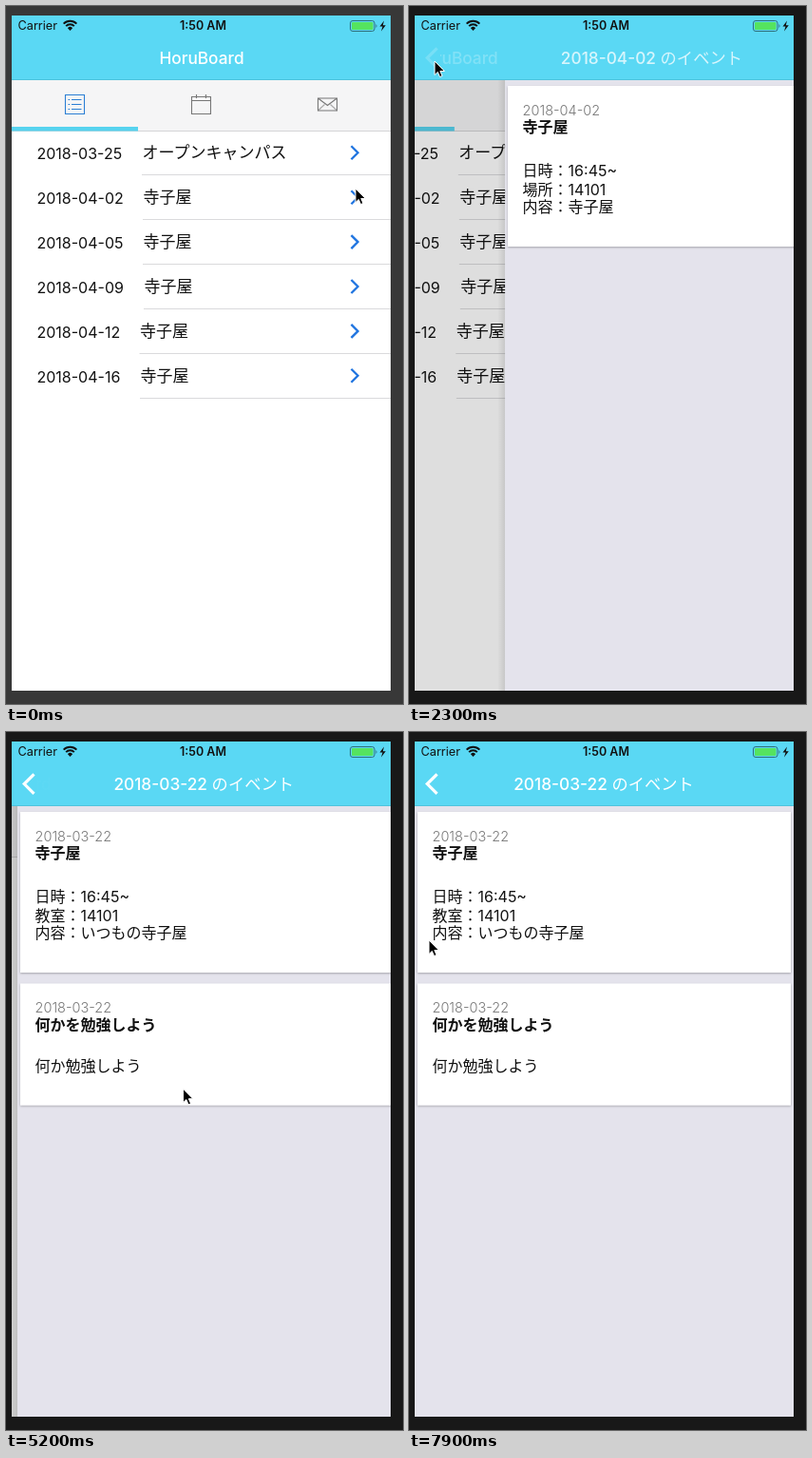
Write an HTML page that moves like this. It is 418 px wide and 734 px high and loops after 8000 ms.

```html
<!DOCTYPE html>
<html lang="ja">
<head>
<meta charset="utf-8">
<title>Event list</title>
<style>
html, body { margin: 0; width: 100%; height: 100%; overflow: hidden; background: #181818; }
svg { display: block; width: 100vw; height: 100vh; }
text { font-family: Inter, "Noto Sans CJK JP", "Noto Sans CJK", sans-serif; font-size: 16px; fill: #111; white-space: pre; }
.mid { text-anchor: middle; }
.nav { font-size: 17.3px; font-weight: 500; fill: #fff; text-anchor: middle; }
.row { font-size: 17px; }
.date { font-size: 14.5px; font-weight: 300; fill: #777; }
.bold { font-weight: 700; }
.week { font-size: 13.3px; fill: #b6b6ba; text-anchor: middle; }
.day { fill: #3a3a3a; text-anchor: middle; }
.icon { fill: none; stroke-width: 1.1; }
</style>
</head>
<body>
<svg id="stage" viewBox="0 0 418 734" preserveAspectRatio="none"></svg>
<script>
const LOOP = 8000, STEP = 100, WIDTH = 399;
const APP = 'HoruBoard';
const BLUE = '#2b7fd4', GRAY = '#777';

const range = n => [...Array(n).keys()];
const rect = (x, y, w, h, fill, more = '') =>
  `<rect x="${x}" y="${y}" width="${w}" height="${h}" fill="${fill}" ${more}/>`;
const path = (d, more = '') => `<path d="${d}" ${more}/>`;
const text = (x, y, cls, s) => `<text x="${x}" y="${y}" class="${cls}">${s}</text>`;
const group = (id, body, more = '') => `<g id="${id}" ${more}>${body}</g>`;

function listPage() {
  const days = ['03-25', '04-02', '04-05', '04-09', '04-12', '04-16'];
  const left = [143.5, 144.5, 144.5, 145.5, 141, 141.5];
  return rect(6, 78, WIDTH, 642, '#fff') + days.map((day, i) => {
    const y = 46.9 * i;
    return text(32.5, 161 + y, '', '2018-' + day) +
      text(left[i], 160 + y, 'row', i ? '寺子屋' : 'オープンキャンパス') +
      path(`M363.5 ${147.3 + y}l7 7-7 7`, 'fill="none" stroke="#1f74e0" stroke-width="2.3"') +
      rect(left[i] - .5, Math.round(177 + y), 405.5 - left[i], 1, '#dadadc');
  }).join('');
}

function month(y, name, first, count, marked) {
  const colX = i => 48 + 52.45 * i;
  const names = ['Mon', 'Tue', 'Wed', 'Thu', 'Fri', 'Sat', 'Sun'];
  const cells = range(count).map(i => {
    const day = i + 1, x = colX((i + first) % 7);
    const cy = y + 77 + 49 * Math.floor((i + first) / 7);
    const on = marked.includes(day);
    return (on ? `<circle cx="${x}" cy="${cy + 2}" r="17" fill="#14b0ee"/>` : '') +
      `<text x="${x}" y="${cy + 5.8}" class="day"${on ? ' style="fill:#e4f6fd"' : ''}>${day}</text>`;
  });
  return text(205.5, y + 5.8, 'day', name) +
    names.map((n, i) => text(colX(i), y + 44, 'week', n)).join('') + cells.join('');
}

function calendarPage() {
  return rect(6, 78, WIDTH, 642, '#fff') +
    month(159, '2018 03', 3, 31, [22, 25]) +
    month(542, '2018 04', 6, 30, [2, 5, 9, 12]);
}

function tabBar() {
  return rect(6, 78, WIDTH, 53, '#f5f5f6') + rect(6, 131, WIDTH, 1, '#d4d4d6') +
    group('bar', rect(6, 127, 133, 4.5, '#57d3ef')) +
    group('listIcon', path('M62.5 93.5h20v20h-20zM69 98.5h10.5M69 103.5h10.5M69 108.5h10.5M65.5 98.5h1.7M65.5 103.5h1.7M65.5 108.5h1.7'), 'class="icon"') +
    group('calIcon', path('M195.5 95.5h20v18h-20zM195.5 99.5h20M200.5 93v4M210.5 93v4'), 'class="icon"') +
    `<g class="icon" stroke="${GRAY}">` + path('M328.5 97h20v13h-20zl10 7.5 10-7.5') +
    path('M328.5 110l7-6.5M348.5 110l-7-6.5', 'opacity=".6"') + '</g>';
}

function card(y, h, date, title, lines) {
  return rect(9, y, 393, h, '#fff', 'filter="url(#lift)"') +
    text(24.5, y + 30.5, 'date', date) + text(24.5, y + 49, 'bold', title) +
    lines.map(([dy, s]) => text(24.5, y + dy, '', s)).join('');
}

function detailPage() {
  const body = (room, what) => [[95, '日時：16:45~'], [115, room + '：14101'], [133, '内容：' + what]];
  return rect(-2, 78, 8, 642, 'url(#edge)') + rect(6, 78, WIDTH, 642, '#e4e3ec') +
    group('april', card(84, 169, '2018-04-02', '寺子屋', body('場所', '寺子屋'))) +
    group('march', card(84, 169, '2018-03-22', '寺子屋', body('教室', 'いつもの寺子屋')) +
      card(264.5, 128, '2018-03-22', '何かを勉強しよう', [[92.5, '何か勉強しよう']]));
}

function header() {
  const arc = r => path(`M${67.5 - r * .72} ${25.5 - r * .72}A${r} ${r} 0 0 1 ${67.5 + r * .72} ${25.5 - r * .72}`,
    'fill="none" stroke="#111" stroke-width="2"');
  return rect(6, 10, WIDTH, 68, '#5ad8f4') + rect(6, 77, WIDTH, 1, '#4fc3dd') +
    `<text x="12.5" y="25.3" style="font-size:12.7px">Carrier</text>` +
    arc(9.5) + arc(6) + path('M67.5 26l-2.6-2.8a3.6 3.6 0 0 1 5.2 0z', 'fill="#111"') +
    `<text x="207.5" y="25.3" class="mid" style="font-size:12.5px;font-weight:600">1:50 AM</text>` +
    rect(362.5, 15.5, 25.5, 11, 'none', 'rx="2.5" stroke="#2f6f7c"') +
    rect(364, 17, 22.5, 8, '#55e35f', 'rx="1"') +
    path('M389.5 19v4q2-2 0-4z', 'fill="#2f6f7c"') +
    path('M398 15.5l-4.5 6h3l-1.5 5 4.8-6.3h-3z', 'fill="#111"') +
    `<g clip-path="url(#navClip)">${group('home', text(206, 61, 'nav', APP))}</g>` +
    group('event', text(205, 61, 'nav', '<tspan id="eventDate"></tspan> のイベント')) +
    path('M29.5 44.3l-10.3 10.3 10.3 10.3', 'id="back" fill="none" stroke="#fff" stroke-width="3.2"');
}

const $ = id => document.getElementById(id);
$('stage').innerHTML = `<defs>
  <clipPath id="screen">${rect(6, 10, WIDTH, 710, '#000')}</clipPath>
  <clipPath id="navClip">${rect(33, 10, 372, 68, '#000')}</clipPath>
  <linearGradient id="edge"><stop offset="0" stop-opacity="0"/><stop offset="1" stop-opacity=".1"/></linearGradient>
  <filter id="lift" x="-5%" y="-5%" width="110%" height="115%">
    <feDropShadow dx="0" dy="1" stdDeviation="1.3" flood-color="#000" flood-opacity=".28"/></filter>
  </defs>` +
  rect(0, 0, 418, 734, '#181818', 'id="desk"') +
  `<g clip-path="url(#screen)">` +
  group('under', group('list', listPage()) + group('calendar', calendarPage()) + tabBar()) +
  rect(6, 78, WIDTH, 642, '#000', 'id="dim"') +
  group('detail', detailPage()) + header() + `</g>` +
  group('cursor', path('M0 0V14.5L3.3 11.4 5.5 16.6 8 15.5 5.8 10.5H10.4Z',
    'fill="#000" stroke="#fff" stroke-width="1" stroke-linejoin="round"'));

// time, x, y of the pointer tip
const POINTS = [
  [0, 368, 192], [100, 368, 192], [200, 367, 197], [1300, 367, 197],
  [2200, 27, 58], [2500, 27, 58], [3200, 230, 105], [3800, 230, 105],
  [4400, 208, 393], [5000, 208, 393], [5900, 38, 252], [6050, 10, 236],
  [6350, 230, 245], [6500, 230, 245], [6650, 207, 390], [7000, 207, 390],
  [7600, 27, 217], [7750, 27, 217], [7900, 21, 219], [LOOP, 21, 219]
];

const clamp = v => Math.min(1, Math.max(0, v));
const ease = v => { v = clamp(v); return v * v * (3 - 2 * v); };
// critically damped spring, 0 to 1
const spring = (ms, rate = 11.2) => {
  const u = Math.max(0, ms) * rate / 1000;
  return 1 - (1 + u) * Math.exp(-u);
};

function pointer(t) {
  const i = POINTS.findIndex((p, k) => k && t <= p[0]);
  const [t0, x0, y0] = POINTS[i - 1], [t1, x1, y1] = POINTS[i];
  const k = ease((t - t0) / (t1 - t0));
  return [x0 + (x1 - x0) * k, y0 + (y1 - y0) * k];
}

// how far the detail page is pushed in
function pushed(t, x) {
  if (t < 2217) return spring(t - 600);
  if (t < 4000) return 1 - spring(t - 2217);
  if (t < 6050) return spring(t - 4650);
  if (t < 6350) return 1 - (x - 10) / WIDTH;
  if (t < 6700) return (1 - 220 / WIDTH) * (1 - spring(t - 6350, 30));
  return spring(t - 6700);
}

const shift = (id, x, y = 0) => $(id).setAttribute('transform', `translate(${x.toFixed(2)} ${y.toFixed(2)})`);
const fade = (id, v) => $(id).setAttribute('opacity', clamp(v).toFixed(3));
const show = (id, on) => $(id).setAttribute('display', on ? 'inline' : 'none');

function draw(t) {
  const [x, y] = pointer(t);
  const raw = pushed(t, x), p = raw < .001 ? 0 : raw > .999 ? 1 : raw;
  const out = (1 - p) * WIDTH;
  const page = ease((t - 3300) / 380);
  const april = t < 4000;
  const popping = (t >= 2217 && t < 4000) || (t >= 6050 && t < 6700);

  $('desk').setAttribute('fill', t < 500 ? '#383838' : '#181818');
  shift('cursor', x, y);

  shift('list', -WIDTH * page);
  shift('calendar', WIDTH * (1 - page));
  shift('bar', 133 * page);
  $('listIcon').setAttribute('stroke', t < 3400 ? BLUE : GRAY);
  $('calIcon').setAttribute('stroke', t < 3300 ? GRAY : BLUE);

  shift('under', -.3 * WIDTH * p);
  fade('dim', .17 * p);
  show('detail', p > 0);
  shift('detail', out);
  show('april', april);
  show('march', !april);

  $('eventDate').textContent = april ? '2018-04-02' : '2018-03-22';
  shift('event', .53 * out);
  fade('event', p);
  shift('home', -206 * p);
  fade('home', 1 - p);
  fade('back', popping ? (p - .7) * 3 : p);
}

function tick(now) {
  const t = now % LOOP;
  draw(Math.floor(t / STEP) * STEP);
  requestAnimationFrame(tick);
}
draw(0);
requestAnimationFrame(tick);
</script>
</body>
</html>
```
